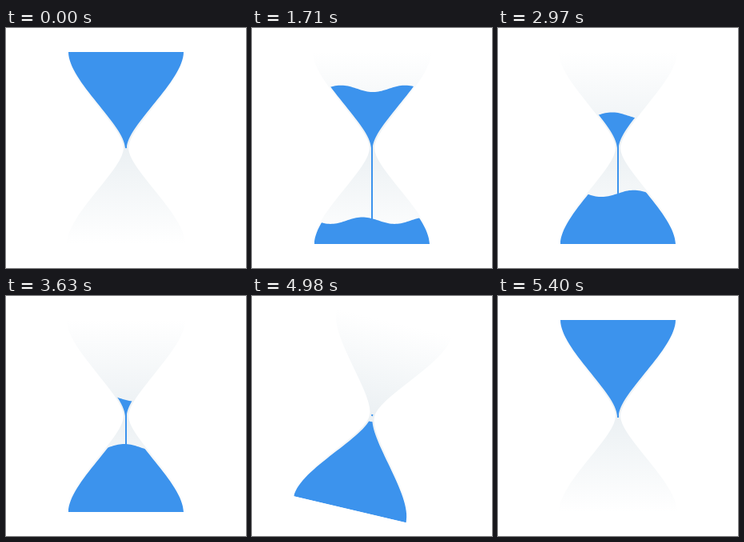
An HTML page with a canvas that plays this animation: 300x300 px, repeating every 5.43 s.

```html
<!DOCTYPE html>
<html lang="en">
<head>
<meta charset="utf-8">
<title>Hourglass</title>
<style>
  html, body { margin: 0; width: 100%; height: 100%; overflow: hidden; background: #fff; }
  canvas { display: block; width: 300px; height: 300px; }
</style>
</head>
<body>
<canvas width="300" height="300"></canvas>
<script>
const canvas = document.querySelector('canvas');
const ctx = canvas.getContext('2d');
const scale = window.devicePixelRatio || 1;
canvas.width = canvas.height = 300 * scale;

const LOOP = 5430;
const SAND = '#3c93ed';
const FLOW = 0.0268;          // level change, px per ms
const FALL = 0.191;           // speed of the stream, px per ms
const FILL_START = 617;
const EMPTY = 120 / FLOW;
const TURN_START = 4860, TURN_TIME = 540;
const WAVE = { length: 80, period: LOOP / 6, height: 4.2, grow: 440 };

const clamp = (v, lo = 0, hi = 1) => Math.min(hi, Math.max(lo, v));

// Path of one bulb; y0 is its wide end, dir points to the neck.
function bulb(y0, dir) {
  const p = new Path2D();
  const y = d => y0 + dir * d;
  p.moveTo(78, y(0));
  p.bezierCurveTo(78, y(36), 149, y(92), 149, y(120));
  p.lineTo(151, y(120));
  p.bezierCurveTo(151, y(92), 222, y(36), 222, y(0));
  p.closePath();
  return p;
}

function glassFill(y0) {
  const g = ctx.createLinearGradient(0, 150, 0, y0);
  g.addColorStop(0, '#ebf0f3');
  g.addColorStop(1, '#ffffff');
  return g;
}

const bulbs = [
  { path: bulb(30, 1), glass: glassFill(30) },
  { path: bulb(270, -1), glass: glassFill(270) }
];

function drawGlass({ path, glass }) {
  ctx.fillStyle = ctx.strokeStyle = glass;
  ctx.lineWidth = 4;
  ctx.fill(path);
  ctx.stroke(path);
}

// Sand below a travelling wave, clipped to its bulb.
function drawSand({ path }, level, floor, crest, age, t) {
  const height = WAVE.height * clamp(age / WAVE.grow);
  const shift = crest + WAVE.length * t / WAVE.period;
  ctx.save();
  ctx.clip(path);
  ctx.beginPath();
  ctx.moveTo(76, floor);
  for (let x = 76; x <= 224; x += 2) {
    ctx.lineTo(x, level - height * Math.cos(2 * Math.PI * (x - shift) / WAVE.length));
  }
  ctx.lineTo(224, floor);
  ctx.fill();
  ctx.restore();
}

function drawStream(t, bottom) {
  const start = 142 + FALL * Math.max(0, t - EMPTY);
  const end = Math.min(150 + FALL * t, bottom);
  if (end > start) ctx.fillRect(149, start, 2, end - start);
  if (t > EMPTY) ctx.fillRect(149, 148, 2, 2);
}

function turn(t) {
  const p = clamp((t - TURN_START) / TURN_TIME) ** 1.2;
  return Math.PI * p * p * (3 - 2 * p);
}

function draw(t) {
  ctx.setTransform(scale, 0, 0, scale, 0, 0);
  ctx.fillStyle = '#fff';
  ctx.fillRect(0, 0, 300, 300);
  ctx.translate(150, 150);
  ctx.rotate(turn(t));
  ctx.translate(-150, -150);

  bulbs.forEach(drawGlass);

  const [upper, lower] = bulbs;
  const top = 30 + FLOW * t;
  const age = t - FILL_START;
  const bottom = 270 - FLOW * Math.max(0, age);
  ctx.fillStyle = SAND;
  drawSand(upper, top, 150, 40, t, t);
  if (age > 0) drawSand(lower, bottom, 270, 67, age, t);
  drawStream(t, bottom);
}

const begin = performance.now();
function frame() {
  draw((performance.now() - begin) % LOOP);
  requestAnimationFrame(frame);
}
frame();
</script>
</body>
</html>
```
